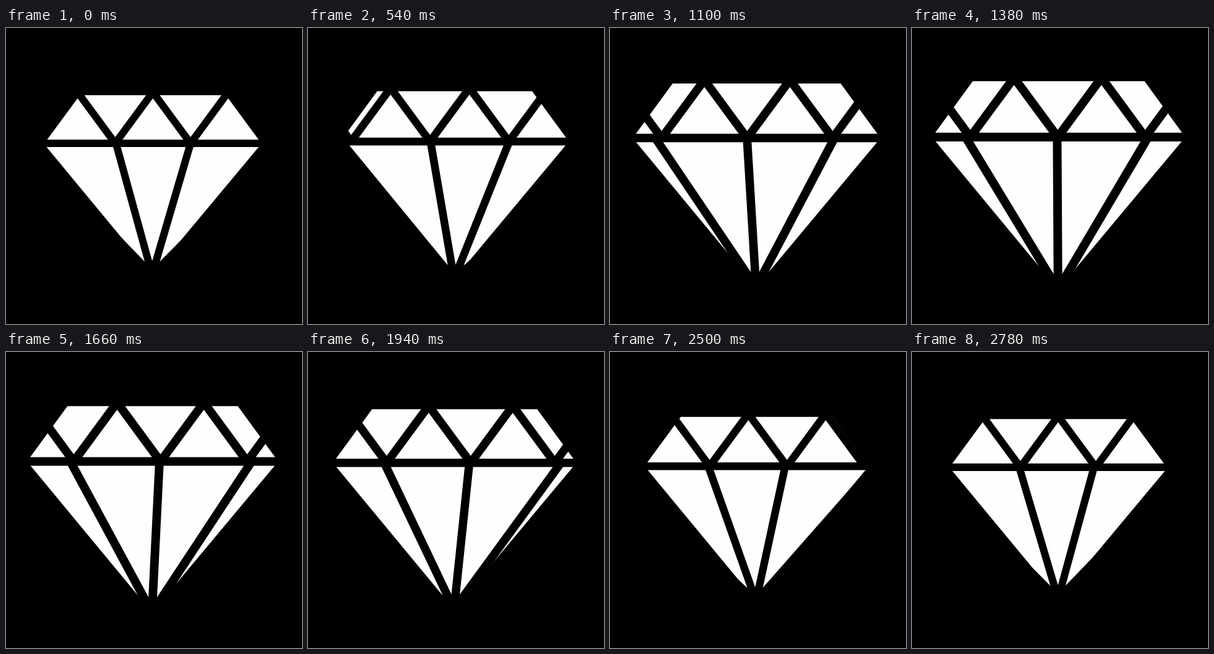
Animation, 480 px wide and 480 px high, one loop 2880 ms. Source, as an HTML page:

```html
<!DOCTYPE html>
<html lang="en">
<head>
<meta charset="utf-8">
<title>Turning diamond</title>
<style>
  html, body { margin: 0; width: 100%; height: 100%; overflow: hidden; background: #000; }
  svg { display: block; width: 100%; height: 100%; }
</style>
</head>
<body>
<svg viewBox="0 0 480 480">
  <!-- gem space: x = 0 is the axis, y = 0 the centre of scaling -->
  <g id="gem">
    <path fill="#fefefd" d="M-177-63L-120-141H120L177-63L-.8 150Z"/>
    <g fill="none" stroke="#000" stroke-width="12.1" stroke-linejoin="bevel">
      <path d="M-190-63H190"/>
      <path id="crown"/>
      <path id="pavilion"/>
    </g>
  </g>
</svg>
<script>
const LOOP = 2880, STEPS = 60, PERIOD = 122.2;
const GIRDLE = -63, TOP = -146, TIP_X = -0.9, TIP_Y = 150;
const gem = document.getElementById('gem');
const crown = document.getElementById('crown');
const pavilion = document.getElementById('pavilion');

// Steps last 20, 100 and 20 ms in turn; the last one is held longer.
function stepAt(t) {
  const r = t % 140;
  const step = 3 * Math.floor(t / 140) + (r < 20 ? 0 : r < 120 ? 1 : 2);
  return Math.min(step, STEPS - 1);
}

const ease = x => x * x * (2.8 - 1.8 * x);

function scaleAt(step) {
  const half = STEPS / 2;
  return step <= half
    ? 1 + 0.162 * ease(step / half)
    : 1.162 - 0.162 * ease((step - half) / half);
}

function draw(time) {
  const step = stepAt(time % LOOP);
  const crownShift = 0.4 + 2.05 * step;
  const rayShift = 1 + 2 * step;
  let zigzag = '', rays = '';

  for (let i = -3; i <= 2; i++) {
    const peak = crownShift + i * PERIOD;
    zigzag += `${zigzag ? 'L' : 'M'}${peak} ${TOP}L${peak + PERIOD / 2} ${GIRDLE}`;

    // The rays swing round the axis, so they crowd towards the rim.
    const turn = rayShift + (i + 0.5) * PERIOD;
    if (Math.abs(turn) < 250) {
      const angle = 1.234 * Math.sin(turn / 270);
      rays += `M${(TIP_Y - GIRDLE) * Math.tan(angle)} ${GIRDLE}L${TIP_X} ${TIP_Y}`;
    }
  }

  crown.setAttribute('d', zigzag);
  pavilion.setAttribute('d', rays);
  gem.setAttribute('transform', `translate(237.8 250) scale(${scaleAt(step)})`);
}

const start = performance.now();
function tick() {
  draw(performance.now() - start);
  requestAnimationFrame(tick);
}
tick();
</script>
</body>
</html>
```
